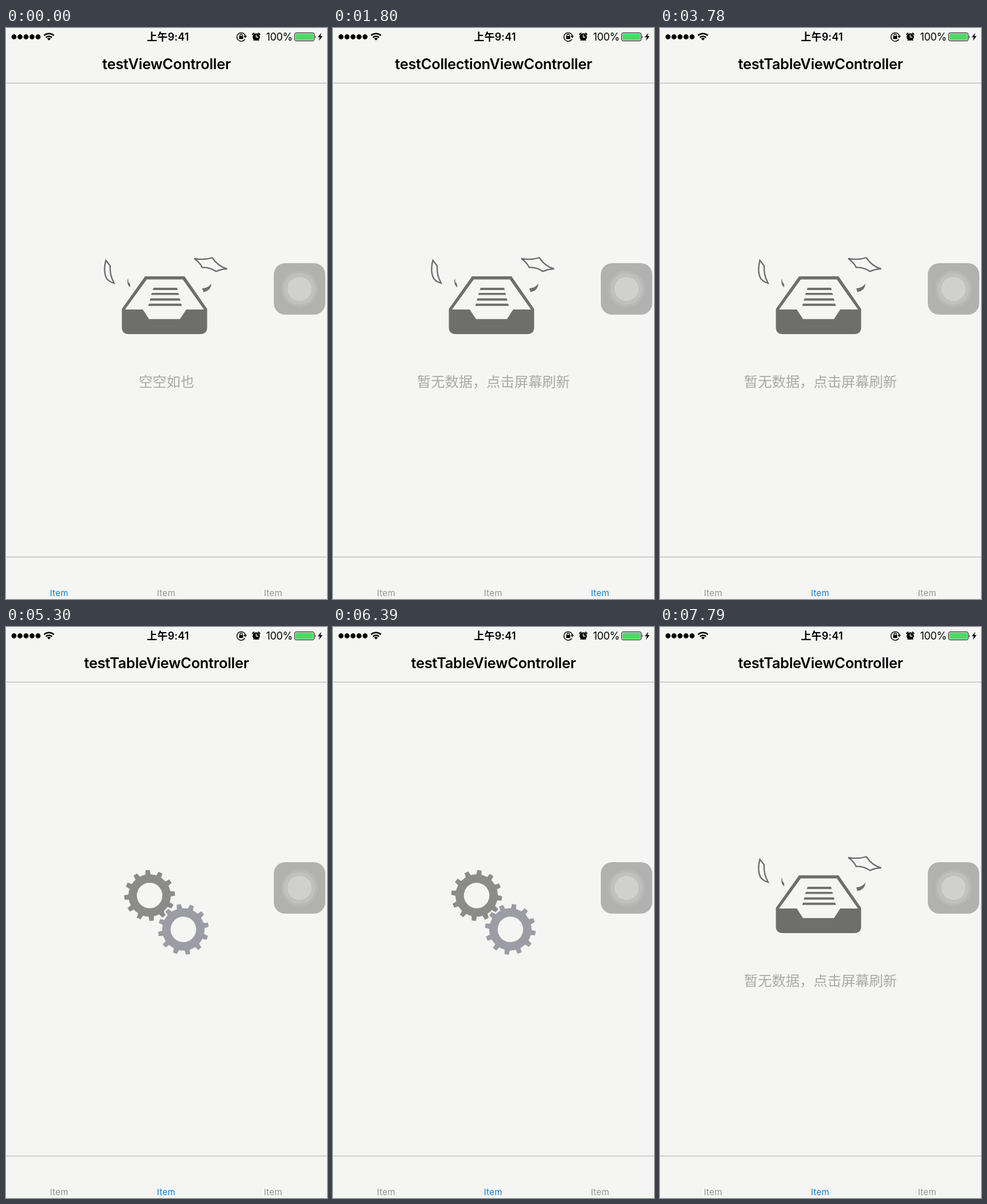
Write an HTML page that moves like this. It is 561 px wide and 998 px high and loops after 8 s.

```html
<!DOCTYPE html>
<html lang="zh-CN">
<head>
<meta charset="utf-8">
<style>
html, body { margin: 0; width: 100%; height: 100%; overflow: hidden; background: #f5f5f3; }
svg { display: block; width: 561px; height: 998px; }
text { font-family: Inter, "Noto Sans CJK SC", "Noto Sans CJK", sans-serif; }
.title { font-size: 25.4px; font-weight: 600; letter-spacing: -0.28px; }
.clock { font-size: 18px; font-weight: 600; letter-spacing: 0.2px; }
.charge { font-size: 18px; letter-spacing: -0.35px; }
.note { font-family: "Noto Sans CJK SC", "Noto Sans CJK", sans-serif; font-size: 24.3px; fill: #a9a9a9; }
.tab { font-size: 15px; letter-spacing: 0.3px; fill: #929292; }
.tab.on { fill: #0a7fd9; }
.mid { text-anchor: middle; }
.line { fill: none; stroke: #000; }
</style>
</head>
<body>
<svg viewBox="0 0 561 998">
  <rect width="561" height="998" fill="#f5f5f3"/>

  <g id="status">
    <g id="dots"></g>
    <g class="line" stroke-width="2.5">
      <path d="M66.500 13.200 A12.500 12.500 0 0 1 83.700 13.200"/>
      <path d="M69.800 16.600 A7.500 7.500 0 0 1 80.400 16.600"/>
    </g>
    <path d="M75.100 21.800 L71.900 18.600 A4.500 4.500 0 0 1 78.300 18.600Z"/>
    <text class="clock mid" x="283" y="21.700">上午9:41</text>
    <path class="line" stroke-width="1.400" d="M417.500 19.600 A7.500 7.500 0 1 1 418.400 14"/>
    <path d="M415.200 13.800 H421 L418.200 17.800Z"/>
    <rect x="407.500" y="14" width="7" height="5.300" rx=".6"/>
    <path class="line" stroke-width="1.300" d="M409 14 V12.500 A2 2 0 0 1 413 12.500 V14"/>
    <circle cx="437.300" cy="15.600" r="6.400"/>
    <path class="line" stroke-width="2" stroke-linecap="round" d="M431 11 L433.200 9 M443.600 11 L441.400 9"/>
    <path class="line" stroke-width="1.600" d="M432.600 22 L434 20.300 M442 22 L440.600 20.300"/>
    <path d="M437.300 11.500 V16 H441" fill="none" stroke="#f5f5f3" stroke-width="1.300"/>
    <text class="charge" x="454.500" y="21.800">100%</text>
    <rect class="line" x="504.500" y="8.500" width="34" height="14" rx="2.500"/>
    <rect x="506" y="10" width="31" height="11" rx="1" fill="#4cd964"/>
    <path d="M540 12.700 Q542.200 15.500 540 18.300Z"/>
    <path d="M551 8.500 L544.800 16.300 H548.500 L546.800 22.500 L553.300 14.200 H549.500Z"/>
  </g>

  <text id="title" class="title mid" x="280.500" y="71.600"></text>
  <rect y="95.700" width="561" height="1.300" fill="#b9b9c4"/>
  <rect y="924" width="561" height="1.200" fill="#b5b5b0"/>

  <g id="empty">
    <g fill="#6e6e6d">
      <path fill-rule="evenodd" d="M202.500 491 L243 434 H312 L351.500 491 V523 Q351.500 535 339.500 535 H214.500 Q202.500 535 202.500 523Z
        M208 492 L246 439.500 H309 L346 492 H315 L304 508.800 H250 L239 492Z"/>
      <path d="M258 454 H299 L300 458 H256.500Z M255 463 H301 L302.500 466.500 H253.500Z M252.500 472.500 H303.500 L305 476.500 H251Z M250 481.700 H306 L307.500 485.700 H248.500Z"/>
      <path d="M213 437 Q210 448 217 453.500 Q218 447 214 444Z"/>
      <path d="M359 447 Q358 459 345 461.500 L343 455 Q352 455 359 447Z"/>
    </g>
    <g fill="none" stroke="#6b6b6e" stroke-width="2.300">
      <path d="M174.500 406 Q169.500 426 176 438 Q181 444 189 446 Q181 432 182 415.500 Q179 412 174.500 406Z"/>
      <path d="M329 403 Q346 406 360.500 401.500 Q371 417 386.500 421 Q377 421 367 425.500 Q356 418 343 418.500 Q338 409 329 403Z"/>
    </g>
    <text id="note" class="note mid" x="280.500" y="626.500"></text>
  </g>

  <g id="gears">
    <path id="gearA" fill="#8b8b89" fill-rule="evenodd"/>
    <path id="gearB" fill="#9c9ca5" fill-rule="evenodd"/>
  </g>

  <g id="tabs">
    <text class="tab mid" x="92.800" y="992.800">Item</text>
    <text class="tab mid" x="279.800" y="992.800">Item</text>
    <text class="tab mid" x="466.800" y="992.800">Item</text>
  </g>

  <g id="assist">
    <rect x="468" y="411" width="90" height="90" rx="20" fill="#b1b1b0"/>
    <circle cx="513" cy="456" r="32" fill="#b8b8b6"/>
    <circle cx="513" cy="456" r="27.500" fill="#c1c1bf"/>
    <circle cx="513" cy="456" r="21.800" fill="#d0d0cf" stroke="#bcbcba"/>
  </g>
</svg>
<script>
const $ = id => document.getElementById(id);
const LOOP = 8000;
const TITLES = ['testViewController', 'testTableViewController', 'testCollectionViewController'];
const NOTES = ['空空如也', '暂无数据，点击屏幕刷新', '暂无数据，点击屏幕刷新'];

// [start ms, selected tab, loading]
const STEPS = [
  [0, 0, false], [20, 2, true], [1640, 2, false],
  [2080, 1, false], [2590, 0, false], [3070, 2, false], [3500, 1, false],
  [4130, 0, false], [4630, 1, false],
  [5140, 1, true], [7590, 1, false]
];

const SPIN = 0.0375; // degrees per ms
const tabs = [...$('tabs').children];

function ring(r) {
  return `M${r} 0 A${r} ${r} 0 1 1 ${-r} 0 A${r} ${r} 0 1 1 ${r} 0Z`;
}

function gearPath(teeth) {
  const hub = 37, tip = 44.5, root = 4.6, top = 3.7;
  const a0 = Math.asin(root / hub), a1 = Math.asin(top / tip);
  const at = (r, a) => `${(r * Math.cos(a)).toFixed(2)} ${(r * Math.sin(a)).toFixed(2)}`;
  let d = '';
  for (let i = 0; i < teeth; i++) {
    const a = i * 2 * Math.PI / teeth;
    d += `${i ? 'L' : 'M'}${at(hub, a - a0)} L${at(tip, a - a1)} L${at(tip, a + a1)} L${at(hub, a + a0)}`;
    d += `A${hub} ${hub} 0 0 1 ${at(hub, a + 2 * Math.PI / teeth - a0)}`;
  }
  return d + 'Z' + ring(22.3);
}

for (let i = 0; i < 5; i++) {
  const dot = document.createElementNS('http://www.w3.org/2000/svg', 'circle');
  dot.setAttribute('cx', 14 + i * 10.5);
  dot.setAttribute('cy', 15.5);
  dot.setAttribute('r', 4.4);
  $('dots').append(dot);
}
$('gearA').setAttribute('d', gearPath(12));
$('gearB').setAttribute('d', gearPath(12));

let shown = null;

function show(step) {
  const [, tab, loading] = step;
  $('title').textContent = TITLES[tab];
  $('note').textContent = NOTES[tab];
  $('empty').style.display = loading ? 'none' : '';
  $('gears').style.display = loading ? '' : 'none';
  tabs.forEach((el, i) => el.classList.toggle('on', i === tab));
  shown = step;
}

function draw(t) {
  const step = STEPS.filter(s => s[0] <= t).pop();
  if (step !== shown) show(step);
  const turn = SPIN * (t - 5300);
  $('gearA').setAttribute('transform', `translate(251 469.300) rotate(${turn - 4.5})`);
  $('gearB').setAttribute('transform', `translate(310 528.500) rotate(${-turn - 10.5})`);
}

const start = performance.now();
function tick() {
  draw((performance.now() - start) % LOOP);
  requestAnimationFrame(tick);
}
tick();
</script>
</body>
</html>
```
